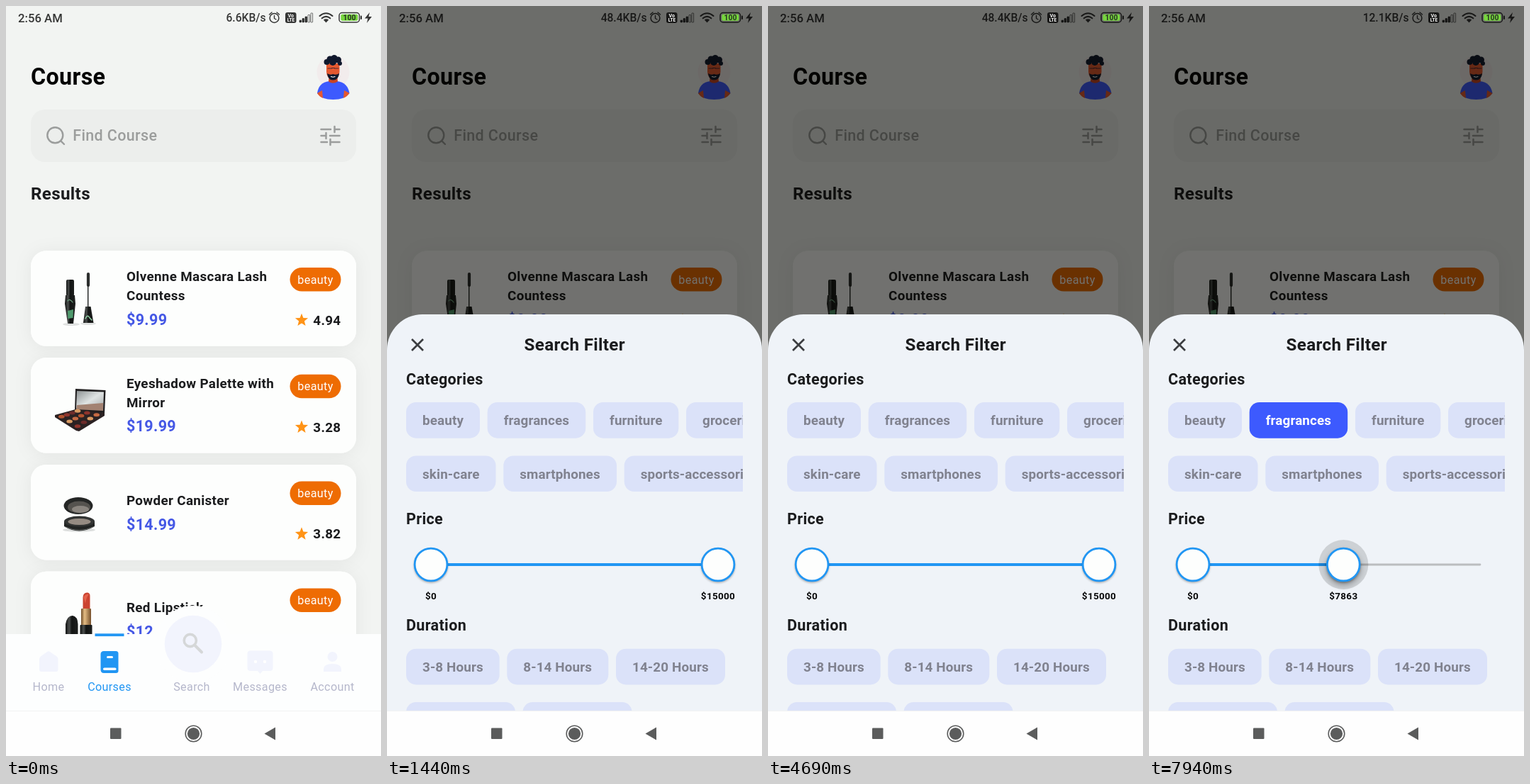
An HTML page that plays this animation: 529 by 1058 pixels, repeating every 8 s.

```html
<!DOCTYPE html>
<html lang="en">
<head>
<meta charset="utf-8">
<title>Course filter</title>
<style>
  html, body { margin: 0; width: 100%; height: 100%; overflow: hidden; background: #fdfefd; }
  svg { display: block; width: 100%; height: 100%; }
  text { font-family: Roboto, sans-serif; letter-spacing: .34px; white-space: pre; }
  .status text { letter-spacing: 0; }
  .chips text { letter-spacing: .13px; }
</style>
</head>
<body>
<svg id="stage" viewBox="0 0 529 1058" xmlns="http://www.w3.org/2000/svg"></svg>
<script>
const LOOP = 8000, TICK = 62.5;
const SHEET_AT = 1437, PICK_AT = 4700;
const BLUE = '#2196f3', INK = '#1b1c1e', PALE = '#f2f4fd';
const CHIP = '#dbe2f9', CHIP_TEXT = '#80828f';
const MIN_X = 62, MAX_X = 467, MAX_PRICE = 15000, TRACK_Y = 788;
const SPEEDS = [[0, '6.6KB/s'], [800, '48.4KB/s'], [4900, '12.1KB/s']];

const text = (s, x, y, size, fill = INK, weight = 600, anchor = 'start', extra = '') =>
  `<text x="${x}" y="${y}" font-size="${size}" fill="${fill}" font-weight="${weight}" text-anchor="${anchor}" ${extra}>${s}</text>`;
const rect = (x, y, w, h, r, fill, extra = '') =>
  `<rect x="${x}" y="${y}" width="${w}" height="${h}" rx="${r}" fill="${fill}" ${extra}/>`;
const circle = (x, y, r, fill, extra = '') =>
  `<circle cx="${x}" cy="${y}" r="${r}" fill="${fill}" ${extra}/>`;
const oval = (x, y, rx, ry, fill) =>
  `<ellipse cx="${x}" cy="${y}" rx="${rx}" ry="${ry}" fill="${fill}"/>`;
const path = (d, fill, extra = '') => `<path d="${d}" fill="${fill}" ${extra}/>`;
const line = (d, stroke, width, cap = 'round') =>
  path(d, 'none', `stroke="${stroke}" stroke-width="${width}" stroke-linecap="${cap}" stroke-linejoin="round"`);

const defs = `<defs>
  <filter id="cardShadow" x="-15%" y="-40%" width="130%" height="180%">
    <feDropShadow dx="0" dy="2" stdDeviation="12" flood-color="#000" flood-opacity=".06"/>
  </filter>
  <filter id="soft" x="-50%" y="-50%" width="200%" height="200%"><feGaussianBlur stdDeviation="1.8"/></filter>
  <filter id="blur" x="-50%" y="-50%" width="200%" height="200%"><feGaussianBlur stdDeviation="4"/></filter>
  <linearGradient id="gold"><stop stop-color="#6f4c28"/><stop offset=".35" stop-color="#e5bd85"/><stop offset="1" stop-color="#76502b"/></linearGradient>
  <linearGradient id="black"><stop stop-color="#101211"/><stop offset=".3" stop-color="#4a4d4c"/><stop offset=".5" stop-color="#121413"/><stop offset="1" stop-color="#1d1f1e"/></linearGradient>
  <linearGradient id="mirror" x2="1" y2="1"><stop stop-color="#8d9293"/><stop offset=".5" stop-color="#dfe3e3"/><stop offset="1" stop-color="#a4a8a8"/></linearGradient>
  <clipPath id="chipArea"><rect x="27" y="550" width="475" height="444"/></clipPath>
</defs>`;

function avatar() {
  const skin = '#e5582f', hair = '#10182d';
  const curls = [[452.5, 79, 4], [457, 75, 4.5], [463, 73.5, 4.5], [468.5, 76, 4.5], [471, 81, 3], [461, 79, 5]];
  return circle(461.5, 93, 23, '#f2ecec') +
    path('M439 123 Q441 108 456 106 H467 Q482 108 484.5 123 Q478 132 461.5 132 Q445 132 439 123 Z', '#3d5afe') +
    path('M439 123 L446 119 L447 130 Q442 128 439 123 Z M484.5 123 L477 119 L476 130 Q481 128 484.5 123 Z', skin) +
    path('M456 97 H467 L468 106.5 Q461 111 455 106.5 Z', '#c94424') +
    path('M452 81 H470.5 V93 Q470 103 461.3 103 Q452.5 103 452 93 Z', skin) +
    path('M453 95 Q457 98 461.3 96 Q466 98 470 95 Q469 104.5 461.3 104.5 Q454 104.5 453 95 Z', hair) +
    line('M458.5 99.5 Q461.5 101 464 99.5', '#fff', 1.1) +
    line('M454 88 h5.5 M463.5 88 h5.5 M459.5 87.5 h4', '#4b2630', 1.1) +
    curls.map(c => circle(...c, hair)).join('');
}

function statusBar() {
  const g = 'rgba(0,0,0,.78)';
  const bars = [0, 1, 2, 3, 4].map(i =>
    rect(414 + i * 4, 20 - i * 2.5, 2.6, 3 + i * 2.5, .6, i < 3 ? g : 'none', `stroke="${g}" stroke-width=".7"`)).join('');
  return '<g class="status">' + text('2:56 AM', 17, 22.5, 16.7, g, 500) +
    text('', 366.5, 22, 15.6, g, 500, 'end', 'id="speed"') +
    circle(378.5, 17, 6.4, 'none', `stroke="${g}" stroke-width="1.5"`) +
    line('M378.5 13.5 V17.5 L381 19 M371.5 12 L375 9 M385.5 12 L382 9', g, 1.4) +
    rect(394, 9, 15.5, 15, 3, g) +
    text('Vo', 401.7, 16, 7, '#fff', 700, 'middle') + text('LTE', 401.9, 22.4, 6.4, '#fff', 700, 'middle') + bars +
    line('M442.5 14 Q451.5 6.5 460.5 14 M445.7 17.3 Q451.5 12.6 457.3 17.3', g, 2.1) +
    path('M447.8 19.5 Q451.5 16.8 455.2 19.5 L451.5 23.5 Z', g) +
    rect(470, 9.5, 28.5, 13.5, 4, 'none', `stroke="${g}" stroke-width="1.5"`) +
    rect(472.3, 11.8, 24, 9, 2, '#76d63d') + rect(500, 13.5, 2, 5.5, 1, g) +
    text('100', 484.5, 20, 10.5, '#263322', 600, 'middle') +
    path('M513 9 L506 17.5 H510.5 L509 24 L516 15 H511.5 Z', g) + '</g>';
}

function mascara() {
  return oval(92, 449, 12, 2, '#dfe1e0') + oval(116, 448, 11, 2, '#dfe1e0') +
    rect(85, 386, 11, 23, 2, 'url(#black)') +
    path('M84 408 H97 L98 420 L95 448 H87 L83 420 Z', 'url(#black)') +
    path('M87 430 L95 428 L94.500 440 L87.500 441 Z', '#4f9a6d') + line('M87 416 Q90 412 94 418', '#6b9c7c', 1.3) +
    line('M116 378 V394', '#2c2e2d', 4.2) + line('M115.7 394 V425', '#1c1e1d', 1.4) +
    path('M112 424 H119.500 L123.500 447 H109 Z', 'url(#black)') +
    line('M112 441 Q115 434 118 440 L121 443', '#8fcfa3', 1.5);
}

function palette() {
  const tones = ['#b3532f', '#d99a62', '#8f342c', '#c66a43', '#6d2c2b'];
  let pans = '';
  for (let r = 0; r < 3; r++) for (let c = 0; c < 4; c++) {
    const u = (r + .5) / 3, v = (c + .5) / 4;
    pans += oval(69 + 33 * u + 29 * v + 8 * u * v, 577 + 22 * u - 8 * v - 16 * u * v, 4.3, 2.5, tones[(c * 2 + r) % 5]);
  }
  return path('M98 540 L140.5 542 L139 575 L97 571 Z', '#211f20') +
    path('M100 543 L138 544.5 L137 570 L99 568 Z', 'url(#mirror)') +
    path('M100 563 L137 560 L137 571 L99 569 Z', '#a38272') +
    path('M69 577 L98 569 L139 574 V578 L103 600 L99 599 L69 580 Z', '#2b2223') + pans;
}

function compact() {
  return oval(103, 739, 23, 3, '#dddfde') +
    oval(102, 705, 20.5, 12, '#242625') + oval(103, 707, 16, 8.5, '#55534f') + oval(105, 710, 12, 5, '#8a857f') +
    path('M82 727 V734 Q103 747 125 734 V727 Z', '#222423') +
    oval(103.5, 727, 21.5, 7.5, '#323433') + oval(103.5, 727.5, 16, 4.5, '#958b82') +
    line('M84 735 Q103 744 123 735', '#797b79', .8);
}

function lipstick() {
  return path('M84 900 V872 Q86 860 94 860 Q101 861 101.5 872 V900 Z', 'url(#black)') +
    path('M108.5 854 V834 Q109 827 115 827.5 Q118.5 828 118.5 832 V854 Z', '#cb4330') +
    path('M109.5 834 Q112 829 117 830 Q113 834 112 843 Z', '#e4634c') +
    rect(106, 850, 14, 26, 1, 'url(#gold)') + rect(104.5, 873, 17, 28, 1, 'url(#black)');
}

function star(x, y) {
  const pts = Array.from({ length: 10 }, (_, i) => {
    const r = i % 2 ? 4.1 : 9.6, a = i * Math.PI / 5;
    return (x + r * Math.sin(a)).toFixed(1) + ',' + (y - r * Math.cos(a)).toFixed(1);
  });
  return `<polygon points="${pts.join(' ')}" fill="#ff9316"/>`;
}

const cardY = i => 345.3 + i * 150.8;
const cardBox = (i, extra) => rect(35, cardY(i), 459, 134.5, 22, '#fdfefd', extra);

function card([lines, price, rating, picture], i) {
  const y = cardY(i), first = lines.length > 1 ? 42.4 : 57.5, last = first + (lines.length - 1) * 27;
  return cardBox(i) + picture() +
    lines.map((s, n) => text(s, 170, y + first + n * 27, 18.84)).join('') +
    text(price, 170, y + last + 34.8, 21.53, '#4558e5') +
    rect(400.5, y + 23.7, 72, 33.5, 16.7, '#ee6c03') +
    text('beauty', 436.5, y + 46.2, 16.15, '#fff', 400, 'middle') +
    star(417, y + 98) + text(rating, 472.5, y + 104.4, 18.84, INK, 600, 'end');
}

function page() {
  const g = '#9b9d9c';
  const items = [
    [['Olvenne Mascara Lash', 'Countess'], '$9.99', '4.94', mascara],
    [['Eyeshadow Palette with', 'Mirror'], '$19.99', '3.28', palette],
    [['Powder Canister'], '$14.99', '3.82', compact],
    [['Red Lipstick'], '$12.99', '2.51', lipstick]
  ];
  return rect(0, 0, 529, 1058, 0, '#f2f4f2') +
    text('Course', 35, 111, 32.3, '#050505', 700) + avatar() +
    rect(35, 146, 459, 74, 20, '#eceeec') +
    circle(69.3, 182.3, 11, 'none', `stroke="${g}" stroke-width="2.4"`) + line('M77.3 190.3 L82 195', g, 2.4) +
    text('Find Course', 94.3, 190.3, 21.53, g, 500) +
    line('M444.5 174 H458 M463.5 170 V178 M464 174 H470.5 M444.5 183 H451 M451.5 179 V187 M457 183 H470.5 M444.5 192 H453 M457.500 188 V196 M458 192 H470.5', g, 2.5) +
    text('Results', 35, 273, 24.2) +
    items.map((_, i) => cardBox(i, 'filter="url(#cardShadow)"')).join('') +
    items.map(card).join('');
}

function tabs() {
  const grey = '#b5b7cb';
  const labels = [['Home', 60], ['Courses', 146, BLUE], ['Search', 262], ['Messages', 358.5], ['Account', 460.5]];
  return rect(0, 886, 529, 108, 0, '#fdfefe') + circle(264, 900, 54, '#fdfefe') +
    rect(125.5, 885.3, 41, 3.8, 0, BLUE) +
    circle(264, 900, 40.3, PALE) +
    circle(259.8, 895, 8.6, 'none', 'stroke="#d5d7d8" stroke-width="3.6"') + line('M266.5 902 L276 911.5', '#d5d7d8', 4) +
    path('M47 921 Q47 919 49 917.5 L58 911 Q60 909.5 62 911 L71.5 917.5 Q73.5 919 73.5 921 V936 Q73.5 939 70.5 939 H50 Q47 939 47 936 Z', PALE) +
    path('M138 910 H155 Q158.5 910 158.5 913.5 V938 Q158.5 941 155 941 H138 Q133.5 941 133.5 936 V914.5 Q133.5 910 138 910 Z', BLUE) +
    rect(137, 933.5, 18.5, 3.5, 1.7, '#fff') + rect(142, 917, 9, 3, 1.5, '#fff') +
    path('M344 909.5 H372 Q376.5 909.5 376.5 914 V933.5 Q376.5 938 372 938 H362 L358.5 942 L355 938 H345 Q340.5 938 340.5 933.5 V914 Q340.5 909.5 344 909.5 Z', PALE) +
    circle(352, 925, 2.2, '#fff') + circle(365, 925, 2.2, '#fff') +
    circle(460.5, 918, 7, PALE) + path('M448 939 V936 Q448 928 460.5 928 Q473 928 473 936 V939 Z', PALE) +
    labels.map(([s, x, c = grey]) => text(s, x, 966, 16.15, c, 400, 'middle')).join('');
}

const chip = (label, x, y, w, id = '') =>
  `<g ${id && `id="${id}"`}>${rect(x, y, w, 50.7, 14, CHIP)}${text(label, x + 23, y + 32.2, 18.84, CHIP_TEXT)}</g>`;

function sheet() {
  const chips = [
    ['beauty', 27, 559, 104], ['fragrances', 141.7, 559, 138.5, 'pick'], ['furniture', 291, 559, 120.3], ['groceries', 422, 559, 125],
    ['skin-care', 27, 634.4, 126.5], ['smartphones', 164.3, 634.4, 159.7], ['sports-accessories', 334.7, 634.4, 210],
    ['3-8 Hours', 27, 906.7, 131.7], ['8-14 Hours', 169.3, 906.7, 143], ['14-20 Hours', 323, 906.7, 154],
    ['20-24 Hours', 27, 982, 154], ['24-30 Hours', 191.5, 982, 154]
  ];
  const ring = `stroke="${BLUE}" stroke-width="2.8"`;
  const heading = (s, y) => text(s, 27, y, 21.53);
  return `<g id="sheet">
    ${rect(0, 0, 529, 1058, 0, '#040500', 'fill-opacity=".56"')}
    ${path('M0 994 V485 A50 50 0 0 1 50 435 H479 A50 50 0 0 1 529 485 V994 Z', '#eff3f8')}
    ${line('M35 470 L51 486 M51 470 L35 486', '#3b3d40', 2.7, 'butt')}
    ${text('Search Filter', 264.7, 486.4, 24.2, INK, 600, 'middle')}
    ${heading('Categories', 533.5)}${heading('Price', 731.3)}${heading('Duration', 880.6)}
    <g class="chips" clip-path="url(#chipArea)">${chips.map(c => chip(...c)).join('')}</g>
    ${line(`M${MIN_X} ${TRACK_Y} H${MAX_X}`, '#bbbdbf', 2.8)}
    <path id="active" stroke="${BLUE}" stroke-width="4.2"/>
    ${circle(MIN_X, TRACK_Y + 1.8, 24, '#000', 'opacity=".3" filter="url(#soft)"')}
    ${circle(MIN_X, TRACK_Y, 22.9, '#fdfefd', ring)}
    ${text('$0', MIN_X, 836.5, 13.46, '#08090a', 700, 'middle')}
    <g id="thumb">
      ${circle(0, TRACK_Y, 24, '#000', 'id="halo" fill-opacity=".14"')}
      ${circle(0, TRACK_Y + 1.8, 24, '#000', 'opacity=".3" filter="url(#soft)"')}
      ${circle(0, TRACK_Y + 5, 24, '#000', 'id="lift" filter="url(#blur)"')}
      ${circle(0, TRACK_Y, 22.9, '#fdfefd', ring)}
      ${text('', 0, 836.5, 13.46, '#08090a', 700, 'middle', 'id="price"')}
    </g>
  </g>`;
}

const systemBar = () => rect(0, 994, 529, 64, 0, '#fefefe') + rect(0, 994, 529, 1, 0, '#f1f2f2') +
  rect(147, 1018.5, 15.5, 15.5, 1, '#5b5c5c') +
  circle(264.5, 1026.5, 11.3, 'none', 'stroke="#5b5c5c" stroke-width="1.6"') + circle(264.5, 1026.5, 8.6, '#5b5c5c') +
  path('M364.5 1026.5 L380 1017.5 V1035.5 Z', '#5b5c5c');

const $ = id => document.getElementById(id);
$('stage').innerHTML = defs + page() + tabs() + sheet() + systemBar() + statusBar();
const clamp = v => Math.max(0, Math.min(1, v));
const pickRect = $('pick').querySelector('rect'), pickText = $('pick').querySelector('text');

function draw(t) {
  $('speed').textContent = SPEEDS.filter(s => s[0] <= t).pop()[1];
  $('sheet').style.display = t < SHEET_AT ? 'none' : '';
  const picked = t >= PICK_AT;
  pickRect.setAttribute('fill', picked ? '#3d5afe' : CHIP);
  pickText.setAttribute('fill', picked ? '#fff' : CHIP_TEXT);

  // The drag advances sixteen times a second.
  const k = Math.floor(t / TICK);
  const price = Math.round(MAX_PRICE - 7137 * clamp((k - 117.2) / 9.8) ** 1.2195);
  const x = MIN_X + (MAX_X - MIN_X) * price / MAX_PRICE;
  $('thumb').setAttribute('transform', `translate(${x} 0)`);
  $('active').setAttribute('d', `M${MIN_X} ${TRACK_Y} H${x}`);
  $('price').textContent = '$' + price;
  $('lift').setAttribute('opacity', .3 * clamp((k - 116) / 2));
  $('halo').setAttribute('r', 24 + 11 * clamp((k - 118) / 3));
}

const start = performance.now();
function frame() {
  draw((performance.now() - start) % LOOP);
  requestAnimationFrame(frame);
}
frame();
</script>
</body>
</html>
```
